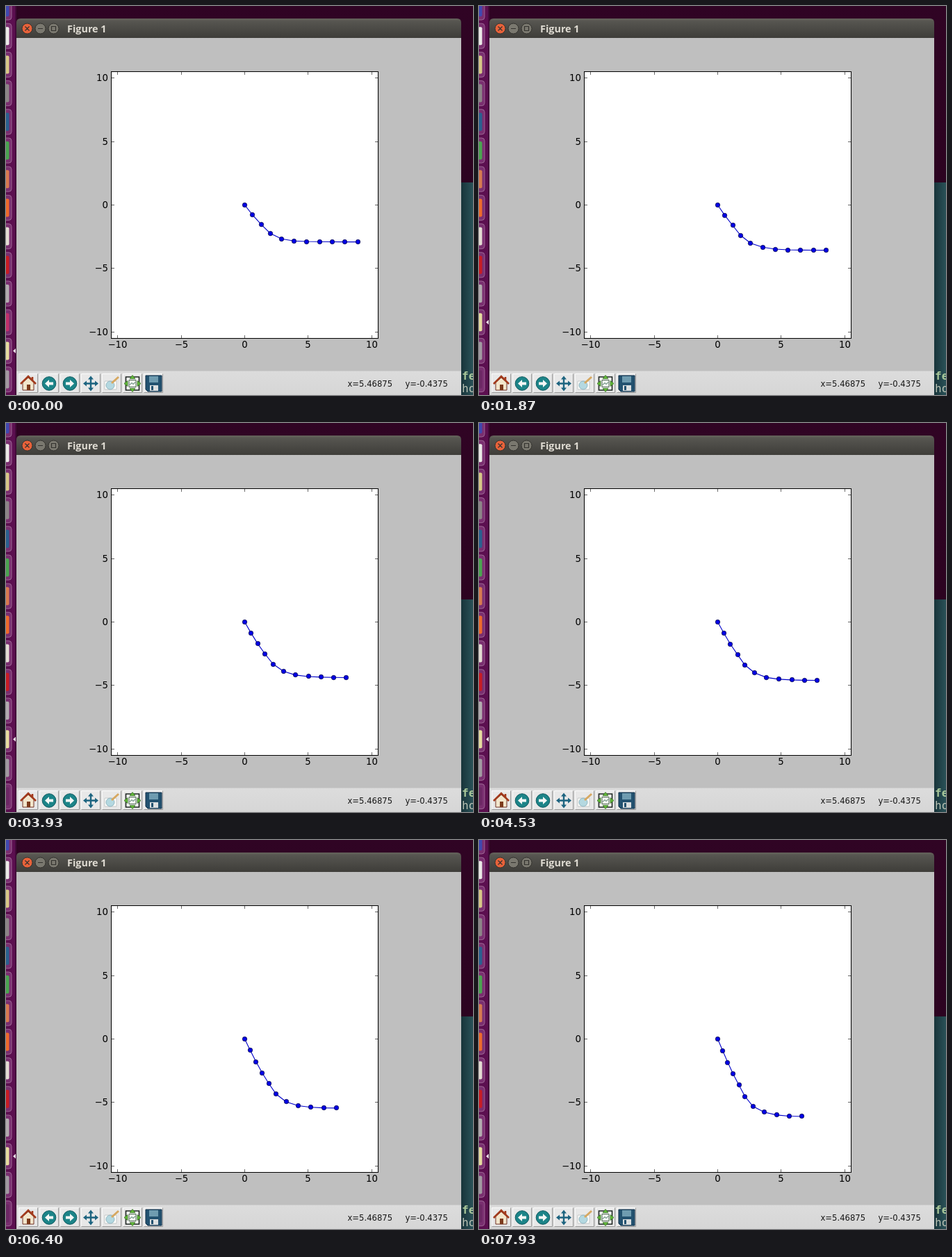
An HTML page that plays this animation: 672 by 560 pixels, repeating every 8 s.

```html
<!DOCTYPE html>
<html lang="en">
<head>
<meta charset="utf-8">
<title>Figure 1</title>
<style>
  html, body { margin: 0; width: 100%; height: 100%; overflow: hidden; background: #2c0320; }
  svg { display: block; width: 672px; height: 560px; }
  text { white-space: pre; }
  .plot text { font: 13.3px "DejaVu Sans", sans-serif; }
</style>
</head>
<body>
<svg viewBox="0 0 672 560">
  <defs>
    <linearGradient id="bar" x2="0" y2="1">
      <stop stop-color="#66645c"/><stop offset=".15" stop-color="#565550"/><stop offset="1" stop-color="#3e3d39"/>
    </linearGradient>
    <linearGradient id="desk" x2="0" y2="1">
      <stop stop-color="#300424"/><stop offset="1" stop-color="#27021c"/>
    </linearGradient>
    <linearGradient id="term">
      <stop stop-color="#18343a"/><stop offset="1" stop-color="#2a5258"/>
    </linearGradient>
    <linearGradient id="tools" x2="0" y2="1">
      <stop stop-color="#dcdcdc"/><stop offset="1" stop-color="#d6d6d6"/>
    </linearGradient>
  </defs>

  <rect width="672" height="560" fill="url(#desk)"/>
  <rect x="655" y="254" width="17" height="306" fill="url(#term)"/>
  <g font-family="'DejaVu Sans Mono', monospace" font-size="16">
    <text x="656" y="538" fill="#a9c79a" font-weight="bold">fe</text>
    <text x="656" y="556" fill="#b9c2b4">ho</text>
  </g>

  <rect width="15" height="560" fill="#5c0f50"/>
  <rect x="13" width="2" height="560" fill="#430a3a"/>
  <g id="launcher"></g>

  <path d="M15 46V24q0-6 6-6H649q6 0 6 6V46Z" fill="url(#bar)"/>
  <rect x="15" y="46" width="640" height="480" fill="#bfbfbf"/>
  <rect x="15" y="525.5" width="640" height="34.5" fill="url(#tools)"/>
  <g stroke="#33322e">
    <circle cx="30.5" cy="32.5" r="7.5" fill="#e8623a"/>
    <circle cx="49.5" cy="32.5" r="7.5" fill="#7a786f"/>
    <circle cx="68.5" cy="32.5" r="7.5" fill="#7a786f"/>
    <path d="M27.5 29.5l6 6m0-6l-6 6M46 32.5h7M65.5 29.5h6v6h-6z" fill="none" stroke-width="1.2"/>
  </g>
  <text x="88" y="37.5" fill="#dfdbd2" font-family="'Open Sans', sans-serif" font-size="14.4" font-weight="bold">Figure 1</text>

  <g id="buttons"></g>
  <g transform="translate(18 529)">
    <path d="M6 13v11h16V13l-8-7z" fill="#f2e6cc" stroke="#713024"/>
    <path d="M3 15L14 4l11 11M20 5v5" fill="none" stroke="#a23a1c" stroke-width="2.6"/>
    <path d="M12 16h5v8h-5z" fill="#7c3a1c"/>
  </g>
  <g id="arrow" transform="translate(62 543.5)">
    <circle r="9.8" fill="#1c8488" stroke="#0f5a60"/>
    <path d="M-6 0l6-5.5v3.5h6v4h-6v3.5z" fill="#f6f8f6"/>
  </g>
  <use href="#arrow" transform="matrix(-1 0 0 1 154 0)"/>
  <g transform="translate(122 543.5)" fill="#1d6480">
    <path d="M-8-1.2H8v2.4H-8zM-1.2-8h2.4V8h-2.4z"/>
    <path d="M0-11l4 5h-8zM0 11l4-5h-8zM-11 0l5-4v8zM11 0l-5-4v8z"/>
  </g>
  <g transform="translate(138 529)">
    <path d="M4 11h17v12H4z" fill="#fcfcfa" stroke="#c4c8c8"/>
    <circle cx="12" cy="17" r="6" fill="#b4d8e0" stroke="#8fb4c0"/>
    <path d="M14 14L24 5" stroke="#d7a860" stroke-width="3"/>
  </g>
  <g transform="translate(182 543.5)">
    <path d="M-9.5-9.5h19v19h-19z" fill="#f8f8f8" stroke="#1c2420" stroke-width="1.6"/>
    <path d="M0-12l4 5h-8zM0 12l4-5h-8zM-12 0l5-4v8zM12 0l-5-4v8z" fill="#62b83a" stroke="#2a6618" stroke-width=".7"/>
    <path d="M-5-5H5V5H-5z" fill="#f4f8f4" stroke="#47604a"/>
    <path d="M-4 2l3-3 2 2 3-3" fill="none" stroke="#2a5a48"/>
  </g>
  <g transform="translate(200 531)">
    <path d="M1 1h23v23H4l-3-3z" fill="#235270" stroke="#10304a"/>
    <path d="M6 2h13v9H6z" fill="#6f9cb0"/>
    <path d="M7 15h12v8H7z" fill="#dcdfe0"/>
    <path d="M9 16h3v6H9z" fill="#235270"/>
  </g>
  <g font-family="'DejaVu Sans', sans-serif" font-size="11.6" fill="#181818">
    <text x="491.5" y="548">x=5.46875</text><text x="574.5" y="548">y=-0.4375</text>
  </g>

  <g class="plot">
    <rect x="151.5" y="94.5" width="384" height="384" fill="#fff" stroke="#000"/>
    <path id="ticks" stroke="#000" stroke-width=".6"/>
    <g id="labels"></g>
    <path id="line" fill="none" stroke="#0000c8" stroke-width="1.1"/>
    <g id="dots" fill="#0000e6" stroke="#000030" stroke-width=".7"></g>
  </g>
</svg>
<script>
const $ = id => document.getElementById(id);
const LOOP = 8000, UNIT = 384 / 21, CX = 343.5, CY = 286.5;
const snap = v => Math.floor(v) + 0.5;

// Axes
let ticks = '', labels = '';
for (const v of [-10, -5, 0, 5, 10]) {
  const x = snap(CX + v * UNIT), y = snap(CY - v * UNIT);
  const name = String(v).replace('-', '\u2212');
  ticks += `M${x} 94.5v4.5M${x} 478.5v-4.5M151.5 ${y}h4.5M535.5 ${y}h-4.5`;
  labels += `<text x="${x}" y="492" text-anchor="middle">${name}</text>
    <text x="147" y="${y + 4}" text-anchor="end">${name}</text>`;
}
$('ticks').setAttribute('d', ticks);
$('labels').innerHTML = labels;

// Toolbar buttons
$('buttons').innerHTML = Array.from({length: 7}, (_, i) => {
  const x = 18.5 + 30 * i;
  return `<rect x="${x}" y="529.5" width="27" height="27" fill="#e8e8e8"/>
    <path d="M${x} 556.5v-27h27" fill="none" stroke="#fcfcfc"/>
    <path d="M${x} 556.5h27v-27" fill="none" stroke="#989898"/>`;
}).join('');

// Launcher: one entry closes and the entries below it slide up
const PITCH = 41.2, CLOSING = 11;
const icons = ['#4048b0', '#eceae8', '#d8c888', '#8d8588', '#2a6090', '#4aa550', '#d87a50',
  '#ee6a2c', '#e4dcd4', '#c81c24', '#b3acb0', '#c0306a', '#e6dca0', '#a29aa2', '#6c2864'];
const tile = (color, i) => `<g>
  <rect x="-28" y="-18" width="36" height="36" rx="4" fill="#7a2f70" stroke="#a878a0" stroke-width=".8"/>
  <rect x="-23" y="-13" width="27.5" height="26" rx="2" fill="${color}"/>
</g>`;
$('launcher').innerHTML = icons.map(tile).join('') +
  '<path d="M14-3.5v7l-4-3.5z" fill="#e9dfe6"/>';
const tiles = [...$('launcher').children];

function drawLauncher(t) {
  const p = Math.min(1, Math.max(0, (t - 200) / 300));
  const slide = PITCH * p * p * (3 - 2 * p);
  tiles.forEach((node, i) => {
    const index = i < icons.length ? i : CLOSING + 1;
    const y = 2 + PITCH * index - (index > CLOSING ? slide : 0);
    node.setAttribute('transform', `translate(0 ${y})`);
  });
  tiles[CLOSING].setAttribute('opacity', 1 - p);
}

// Rope: [step, downward angle of each unit link in degrees]
const poses = [
  [0, 51.5, 48, 44.5, 26, 9.5, 2.5, .5, .8, .5, 0],
  [26, 55.5, 52, 51.5, 38, 18, 9, 3, 1, .5, .3],
  [46, 59, 56.5, 53, 47, 29, 13, 5, 2.5, 1, .5],
  [66, 61, 59.5, 55.5, 55, 39, 21, 8, 3, 1.5, .5],
  [80, 63, 61, 59, 57, 48, 28, 12.5, 5, 1.5, .5],
  [94, 64, 63, 61, 58.5, 55, 37.5, 18, 7, 2.5, 1],
  [117, 67, 66.5, 65, 62.5, 62, 51.5, 27.5, 13, 5, 1.5]
];
$('dots').innerHTML = '<circle r="3.2"/>'.repeat(11);
const dots = [...$('dots').children];

function drawRope(t) {
  const step = Math.max(0, Math.floor((t - 195) * 15 / 1000) + 1);
  let k = 0;
  while (k < poses.length - 2 && poses[k + 1][0] <= step) k++;
  const a = poses[k], b = poses[k + 1];
  const mix = (step - a[0]) / (b[0] - a[0]);
  let x = CX, y = CY, path = '';
  dots.forEach((dot, i) => {
    if (i) {
      const angle = (a[i] + (b[i] - a[i]) * mix) * Math.PI / 180;
      x += UNIT * Math.cos(angle);
      y += UNIT * Math.sin(angle);
    }
    path += `${i ? 'L' : 'M'}${x.toFixed(2)} ${y.toFixed(2)}`;
    dot.setAttribute('cx', snap(x));
    dot.setAttribute('cy', snap(y));
  });
  $('line').setAttribute('d', path);
}

const start = performance.now();
function frame() {
  const t = (performance.now() - start) % LOOP;
  drawLauncher(t);
  drawRope(t);
  requestAnimationFrame(frame);
}
frame();
</script>
</body>
</html>
```
